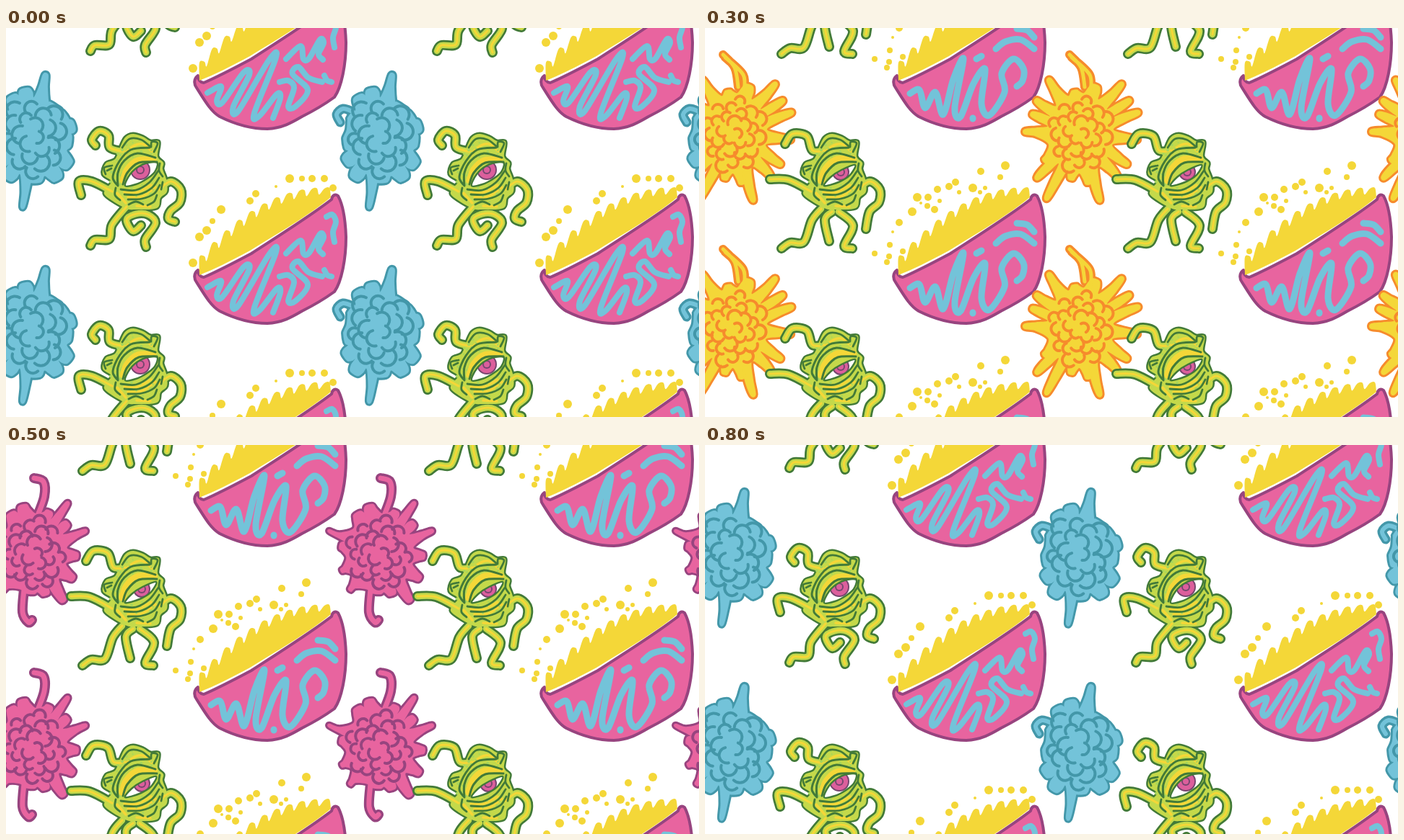
Animation of 960x540 px, one loop 900 ms. Source, as an HTML page:

```html
<!DOCTYPE html>
<html lang="en">
<head>
<meta charset="utf-8">
<title>Mold pattern</title>
<style>
html, body { margin: 0; width: 100%; height: 100%; overflow: hidden; background: #fff; }
svg { display: block; width: 100vw; height: 100vh; }
path { stroke-linecap: round; stroke-linejoin: round; }
</style>
</head>
<body>
<svg id="stage" viewBox="0 0 960 540"></svg>
<script>
const PINK = '#e8649f', PURPLE = '#97447f', BLUE = '#73c3d9', TEAL = '#4397a9';
const YELLOW = '#f4d738', ORANGE = '#f68b2c', GREEN = '#7cc266', LIME = '#c4d94a', DARK = '#427a38';
const TILE = { w: 480, h: 270 };

const parse = s => s.trim().split(/\s+/).map(p => p.split(',').map(Number));

// Smooth curve through points
function curve(p, closed) {
  if (typeof p === 'string') p = parse(p);
  const n = p.length;
  const at = i => closed ? p[(i + n) % n] : p[Math.max(0, Math.min(n - 1, i))];
  const fix = v => v.toFixed(1);
  let d = 'M' + p[0].map(fix);
  for (let i = 0; i < (closed ? n : n - 1); i++) {
    const [a, b, c, e] = [at(i - 1), at(i), at(i + 1), at(i + 2)];
    const c1 = b.map((v, k) => fix(v + (c[k] - a[k]) / 6));
    const c2 = c.map((v, k) => fix(v - (e[k] - b[k]) / 6));
    d += `C${c1} ${c2} ${c.map(fix)}`;
  }
  return d;
}
const path = (d, fill, stroke = 'none', w = 0) =>
  `<path d="${d}" fill="${fill}" stroke="${stroke}" stroke-width="${w}"/>`;
const blob = (p, fill, stroke, w) => path(curve(p, true) + 'Z', fill, stroke, w);
const lines = (s, stroke, w) => path(s.split(';').map(l => curve(l)).join(''), 'none', stroke, w);
const dots = (list, fill) => list.map(([x, y, r]) =>
  `<circle cx="${x.toFixed(1)}" cy="${y.toFixed(1)}" r="${r.toFixed(1)}" fill="${fill}"/>`).join('');

function random(seed) {
  return () => (seed = seed * 16807 % 2147483647) / 2147483647;
}

// Bumps packed in a sunflower spiral, opening towards the middle
function curls(cx, cy, rx, ry, n, size) {
  const rnd = random(n * 31);
  let d = '';
  for (let i = 0; i < n; i++) {
    const a = i * 2.4, q = .88 * Math.sqrt((i + .4) / n);
    const x = cx + rx * q * Math.cos(a), y = cy + ry * q * Math.sin(a);
    const r = size * (.8 + rnd() * .4), t = a + rnd() * 1.6 - .8, h = 1.3 + rnd() * .4;
    const pt = v => `${(x + r * Math.cos(v)).toFixed(1)},${(y + r * Math.sin(v)).toFixed(1)}`;
    d += `M${pt(t - h)}A${r.toFixed(1)},${r.toFixed(1)} 0 0 1 ${pt(t + h)}`;
  }
  return d;
}

// Oval whose edge grows out to each tip "x,y[,half width]", clockwise
function spiky(cx, cy, rx, ry, tips, width) {
  const turn = ([x, y]) => Math.atan2((y - cy) / ry, (x - cx) / rx);
  const rim = a => [cx + rx * Math.cos(a), cy + ry * Math.sin(a)];
  return tips.flatMap((tip, i) => {
    const [x, y, w = width] = tip, a = turn(tip);
    const gap = (turn(tips[(i + 1) % tips.length]) - a + Math.PI * 4) % (Math.PI * 2);
    const len = Math.hypot(x - cx, y - cy), nx = (cy - y) / len, ny = (x - cx) / len;
    const [bx, by] = rim(a), mx = (x + bx) / 2, my = (y + by) / 2;
    const side = (px, py, k) => [px + nx * k, py + ny * k];
    return [side(mx, my, -w), side(x, y, -w * .6), side(x, y, w * .6), side(mx, my, w), rim(a + gap / 2)];
  });
}

function mold({ at, size, tips, width, hooks, hookWidth, fill, edge, n, curl }) {
  const shape = spiky(...at, ...size, parse(tips), width);
  return blob(shape, edge, edge, 6) + (hooks ? lines(hooks, edge, hookWidth + 7) : '') +
    blob(shape, fill, fill, .1) + (hooks ? lines(hooks, fill, hookWidth) : '') +
    path(curls(...at, ...size, n, curl), 'none', edge, 4);
}

const blueMold = mold({
  at: [519, 152], size: [48, 56], width: 10, fill: BLUE, edge: TEAL, n: 21, curl: 10.5,
  tips: '535,64,6 549,107 564,121 575,135 571,157 569,191 552,211 521,215 503,249,5 482,210 469,187 468,160 475,122,6 487,94 506,84',
  hooks: '480,116 467,112 458,120 463,131', hookWidth: 6
});
const pinkMold = mold({
  at: [518, 150], size: [47, 55], width: 7, fill: PINK, edge: PURPLE, n: 26, curl: 8.5,
  tips: '540,91 566,80,5 566,108 591,119,5 580,154 574,186 560,217 535,209 514,207 476,202,5 464,175,5 462,140 447,119,4 486,94,9 503,83,9',
  hooks: '523,100 533,72 532,51 519,46;505,200 503,232 511,246 516,243', hookWidth: 7
});
const greenMold = mold({
  at: [519, 150], size: [45, 55], width: 5, fill: GREEN, edge: LIME, n: 34, curl: 7,
  tips: `526,34,7 565,69 580,98 594,124 586,155 578,188 567,209 546,223 526,219 491,251 474,214 454,191
    457,169 453,156 443,117 467,93 484,71 511,80`
});
const orangeMold = mold({
  at: [520, 146], size: [46, 56], width: 6, fill: YELLOW, edge: ORANGE, n: 28, curl: 8.5,
  tips: `541,79,9 578,77 589,100 601,117 600,155 586,190 572,207 547,240 531,217 507,211 473,237 459,209
    469,185 442,144 452,119 458,100 476,71 512,86`,
  hooks: '505,37 521,55 526,82;508,41 533,65 534,90', hookWidth: 5
});

const body = `165,152 176,147 190,151 200,157 212,158 210,178 218,187 217,196 222,210 223,227 214,236 209,250
  180,252 165,250 139,234 137,225 146,213 134,203 138,188 151,182 157,168`;
const rightArm = '212,224 228,213 242,224 241,242 ';

const openArms = `124,163 119,155 129,143 142,149 144,166 165,172;104,232 101,213 119,213 147,227;
  117,302 123,294 143,293 147,273 167,248;187,274 176,282 167,266 180,258 197,259 207,271 193,293 194,304;` +
  rightArm + '228,254 225,265 234,269';
const halfArms = `111,161 121,147 141,150 149,170 166,170;90,210 116,211 147,227;
  106,306 118,298 137,297 148,267 161,251;172,296 166,266 176,255;204,306 193,302 205,274 185,255;` +
  rightArm + '228,255 223,279';
const closedArms = `111,170 121,147 141,150 149,170 166,170;89,200 108,213 147,227;
  122,311 117,301 125,293 144,291 147,268 160,252;168,309 166,267 176,255;187,312 192,298 204,272 185,255;` +
  rightArm + '226,260 222,284';

const wrinkles = `161,166 171,154 187,155 199,164;201,165 202,158 210,160 205,172;
  138,203 136,194 147,191;140,198 146,195;213,188 212,198 217,206;217,214 215,224;
  152,222 151,232 158,239;170,245 180,241 190,245;196,246 205,241 209,232;` + [0, 1, 2].map(i =>
  `${159 + i * 5},${224 + i * 7} ${180 + i * 4},${225 + i * 6} ${199 + i * 3},${214 + i * 8} ${211 + i},${198 + i * 10}`).join(';');

const openEye = '165,219 172,203 186,191 203,186 210,188 206,200 194,210 180,217';
const halfEye = '165,219 174,207 189,197 208,190 201,204 185,214';

function spots() {
  const rnd = random(9);
  return Array.from({ length: 46 }, () => {
    const a = rnd() * 6.283, q = Math.sqrt(rnd());
    return [178 + 36 * q * Math.cos(a), 201 + 46 * q * Math.sin(a), 1 + rnd()];
  });
}

function awake(id, eye, x, y, r, lid) {
  const ring = (size, fill) => dots([[x, y, size]], fill);
  return `<clipPath id="${id}">${blob(eye, '#000')}</clipPath>` + blob(eye, '#fff') +
    `<g clip-path="url(#${id})">${ring(r + 2, '#77466f')}${ring(r, '#dc5f9c')}${ring(6, '#77466f')}${ring(4, '#dc5f9c')}</g>` +
    lines('161,212 167,196 182,183 205,182', YELLOW, lid) + blob(eye, 'none', DARK, 2.5) +
    lines('155,219 155,201 164,184 182,174 207,180;155,219 148,207 157,185 173,169 199,166;162,217 168,201 184,187 209,186', DARK, 3);
}
const asleep = () =>
  blob('159,221 158,198 170,178 192,171 208,180 209,194 190,211', LIME) +
  lines('166,214 178,207 196,197;164,205 170,191 179,182', YELLOW, 4) +
  lines(`158,221 153,204 160,184 176,168 199,164;158,221 160,197 172,178 191,171 208,181;158,221 167,198 183,180 194,172;
    158,221 177,199 199,177;158,221 182,208 209,190;209,180 211,194 197,209 158,221`, DARK, 3);

const creature = (arms, face) =>
  lines(arms, DARK, 14) + blob(body, LIME, DARK, 5) + lines(arms, LIME, 8.5) + blob(body, LIME) + lines(arms, YELLOW, 3.2) +
  lines('164,177 173,166 189,161 202,171;153,228 166,243;181,247 200,248;164,228 182,228 201,218;169,235 188,234 207,221', YELLOW, 3.5) +
  dots(spots(), '#a8d65c') + lines(wrinkles, DARK, 2.8) + face;

const openCreature = creature(openArms, awake('open', openEye, 186, 197, 12, 7));
const halfCreature = creature(halfArms, awake('half', halfEye, 188, 200, 10, 10));
const closedCreature = creature(closedArms, asleep());

function scallops(n) {
  let p = [];
  for (let i = 0; i < n; i++) {
    const t = i / (n - 1), x = 271 + 173 * t, y = 317 - 95 * t - 100 * t * (1 - t);
    p.push([x - 3, y + 1], [x + 4, y]);
    if (i < n - 1) p.push([x + 7, y + 6 + 3 * t]);
  }
  return [[268, 343], ...p, [450, 235]];
}
const shell =
  path(`M266,336C260,340 260,348 264,353C276,372 284,386 296,393C318,404 340,410 362,410C384,409 398,400 410,393
    C428,384 444,374 455,366C465,352 471,320 471,290C470,262 466,244 460,233C456,230 452,232 451,238
    C420,262 380,287 340,313C310,329 288,340 274,346Q266,345 266,336Z`, PINK, PURPLE, 4) +
  path(curve(scallops(11)) + 'C420,260 375,286 338,309C310,324 288,335 268,343Z', YELLOW);

const bowl = (marks, width, crumbs) => shell + lines(marks, BLUE, width) + dots(crumbs, YELLOW);

const calmBowl = bowl(
  `279,360 298,351 292,371 300,373 329,332 337,335 315,379 322,385 364,315 374,311 344,388 351,392 375,362 380,367 370,395;
   379,345 391,343 399,353 391,379 401,379 418,356 397,334 405,324 419,339 438,345;
   388,313 408,295 412,313 420,312 435,286 440,291 433,306 439,314;444,262 452,259 457,269 453,283 455,297;441,336 445,343 451,345`, 8,
  parse('259,326,6 268,290,6 278,281,6 286,268,4 298,252,6 338,240,5 346,230,5 374,220,2 393,209,6 410,209,4 424,209,5 441,209,5 453,222,5'));

const swellBowl = bowl(
  `286,358 289,371 300,369 321,350 328,368 313,387 304,378 312,365;
   337,346 334,366 354,395 364,362 372,347 382,354 388,386 397,379 403,348 412,353 410,368 419,375 430,367;
   352,335 385,315 389,321 364,335;395,318 392,328 399,331 406,300 413,299 417,326 428,334;
   421,294 420,307 427,314;433,275 440,280 459,263 440,299 452,322 444,333 444,344`, 8,
  parse('249,296,4 264,314,6 270,292,6 294,271,6 309,258,8 332,250,8 354,233,7 379,224,6 397,214,6 409,213,5 424,212,2 441,214,5'));

const burstBowl = bowl(
  `281,357 288,375 302,357 302,381 325,347 317,383 350,328 327,395 365,346 358,386 386,351 377,389 404,358 397,381 419,355 424,360;
   371,317 398,312 396,326 403,335 418,318 411,303 427,288 431,318 440,327 429,341 414,335;
   427,273 440,276 447,291;441,263 452,269 459,287`, 8,
  parse(`237,312 248,318 258,299 265,275 273,274 296,244 305,246 299,256 309,255 308,270 317,235 322,247 322,258 338,223
    338,231 348,222 345,231 362,233 367,212 370,222 378,216 386,225 390,209 401,202 405,210 418,192 421,202
    433,198 443,207 452,212`).map(([x, y]) => [x, y, 4 + (x * 7 + y) % 3]));

const spreadBowl = bowl(
  `284,361 297,356 305,381 319,359 330,390 344,341 358,313 346,380 354,393 372,347 388,327 383,375 394,391 415,359 411,333
   427,313 441,326 440,343 432,351;
   376,313 383,309;371,395 371,396;403,299 416,289 437,286 456,299;432,271 446,273 456,283`, 9,
  parse(`235,313,4 255,317,4 252,325,4 256,301,4 260,283,2 274,310,4 269,270,5 287,255,6 294,235,6 299,243,2 309,235,5
    308,247,4 318,252,5 322,224,5 325,240,3 338,220,5 347,214,5 352,228,3 371,222,6 382,199,5 381,228,3 388,222,3
    409,207,4 416,191,6`));

const kinds = {
  bowl: [calmBowl, swellBowl, burstBowl, spreadBowl],
  mold: [blueMold, pinkMold, greenMold, orangeMold],
  creature: [openCreature, halfCreature, closedCreature]
};
let defs = '', uses = '';
for (const [name, poses] of Object.entries(kinds)) {
  defs += `<g id="${name}">${poses.map(p => `<g>${p}</g>`).join('')}</g>`;
  for (let r = -1; r <= 1; r++)
    for (let c = -1; c <= 1; c++)
      uses += `<use href="#${name}" x="${c * TILE.w}" y="${r * TILE.h}"/>`;
}
document.getElementById('stage').innerHTML = `<defs>${defs}</defs>${uses}`;

const bowlOrder = [0, 1, 2, 3, 3, 3, 2, 1, 0];
const creatureOrder = [0, 1, 2, 1];

function show(name, pose) {
  [...document.getElementById(name).children].forEach((g, i) =>
    g.setAttribute('display', i === pose ? 'inline' : 'none'));
}

let last = -1;
function draw(ms) {
  const step = Math.floor(ms % 900 / 100);
  if (step === last) return;
  last = step;
  show('bowl', bowlOrder[step]);
  show('mold', step % 4);
  show('creature', creatureOrder[step % 4]);
}

const start = performance.now();
function tick() {
  draw(performance.now() - start);
  requestAnimationFrame(tick);
}
tick();
</script>
</body>
</html>
```
